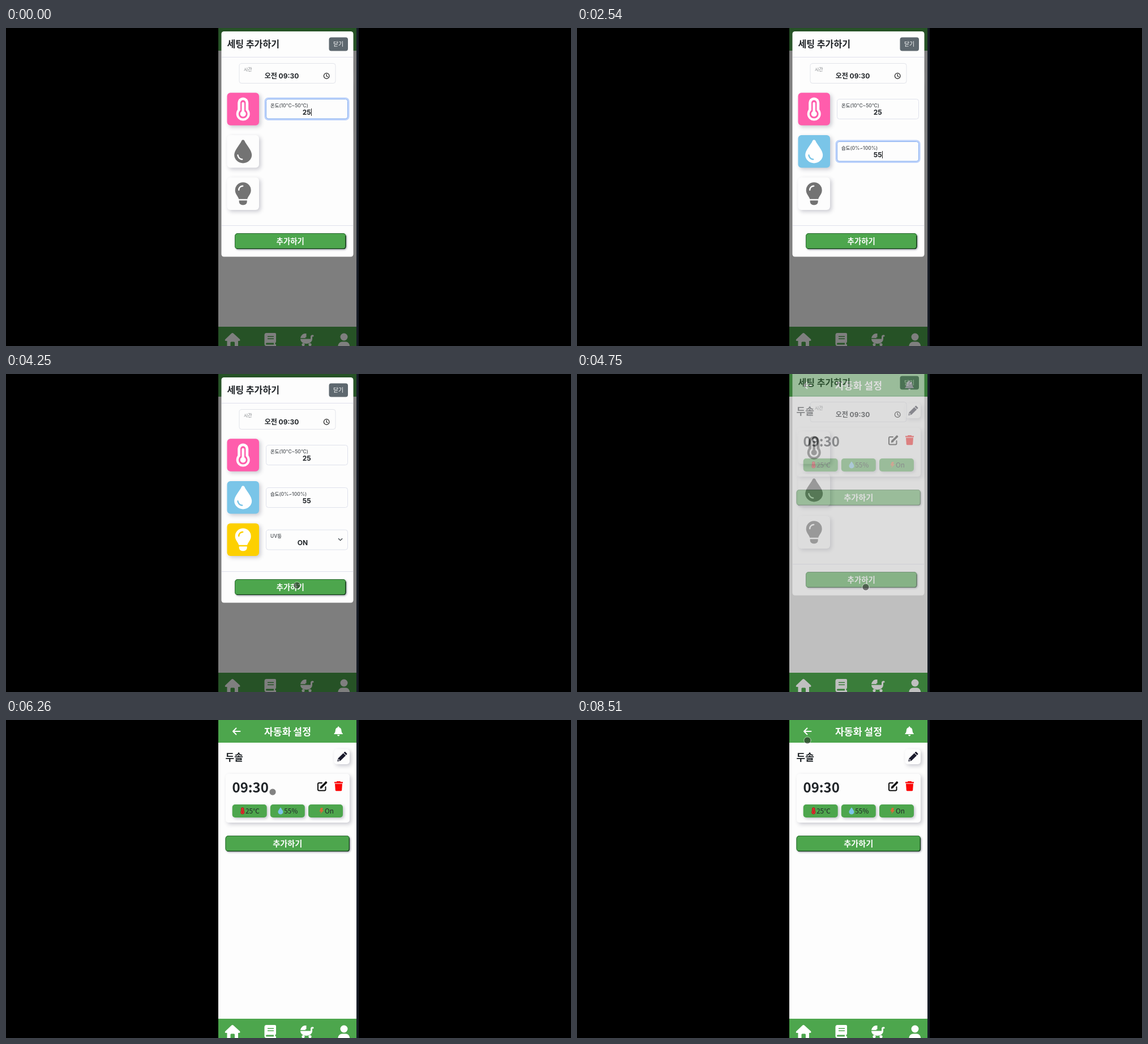
Recreate the animation shown at these times as an HTML page with a canvas. Size 998 by 561 pixels, loop 8.55 s.

```html
<!DOCTYPE html>
<html lang="ko">
<head>
<meta charset="utf-8">
<title>자동화 설정</title>
<style>
html, body { margin: 0; width: 100%; height: 100%; overflow: hidden; background: #000; }
canvas { display: block; }
</style>
</head>
<body>
<canvas id="stage" width="998" height="561"></canvas>
<script>
const W = 998, H = 561, LOOP = 8550;
const main = document.getElementById('stage').getContext('2d');
const layer = document.createElement('canvas');
layer.width = W;
layer.height = H;
const sheet = layer.getContext('2d');
let c = main;

const GREEN = '#4da64d', PAPER = '#fdfdfd', INK = '#212529', GREY = '#737373';
const NOTO = '"Noto Sans CJK KR", "Noto Sans CJK", sans-serif';
const INTER = 'Inter, ' + NOTO;

const CLOSE = 4675, FADE = 150;
const WATER_ON = 980, LAMP_ON = 3000;
const FOCUS = 1700, KEY1 = 2050, KEY2 = 2330, BLUR = 2960;

function box(x, y, w, h, r, fill, stroke, lw = 1) {
  c.beginPath();
  c.roundRect(x, y, w, h, r);
  if (fill) { c.fillStyle = fill; c.fill(); }
  if (stroke) { c.strokeStyle = stroke; c.lineWidth = lw; c.stroke(); }
}

function shadowBox(x, y, w, h, r, fill, off = 3, blur = 7, alpha = 0.24) {
  c.save();
  c.shadowColor = `rgba(40,40,70,${alpha})`;
  c.shadowOffsetX = c.shadowOffsetY = off;
  c.shadowBlur = blur;
  box(x, y, w, h, r, fill);
  c.restore();
}

// cy is the visual middle of the line
function text(s, x, cy, size, color, weight = 700, family = NOTO, align = 'left') {
  c.font = `${weight} ${size}px ${family}`;
  c.textAlign = align;
  c.fillStyle = color;
  c.fillText(s, x, cy + size * 0.37);
}

function disc(x, y, r, fill) {
  c.beginPath();
  c.arc(x, y, r, 0, Math.PI * 2);
  c.fillStyle = fill;
  c.fill();
}

function line(d, color, width) {
  c.strokeStyle = color;
  c.lineWidth = width;
  c.lineCap = c.lineJoin = 'round';
  c.stroke(new Path2D(d));
}

function shape(d, color) {
  c.fillStyle = color;
  c.fill(new Path2D(d), 'evenodd');
}

function at(x, y, scale, draw) {
  c.save();
  c.translate(x, y);
  c.scale(scale, scale);
  draw();
  c.restore();
}

function thermometer(fg, bg) {
  line('M0 -11V8', fg, 19);
  disc(0, 8.5, 12, fg);
  line('M0 -11V8', bg, 9.5);
  disc(0, 8.5, 8, bg);
  line('M0 -10V8', fg, 4.5);
  disc(0, 8.5, 5, fg);
}

function drop(fg, bg) {
  shape('M0 -20.5C1.5 -20.5 2.4 -19.5 3 -18C5 -13 15.5 -2 15.5 6A15.5 14.7 0 0 1 -15.5 6C-15.5 -2 -5 -13 -3 -18C-2.4 -19.5 -1.5 -20.5 0 -20.5Z', fg);
  if (bg) line('M-9.3 6.5A8.5 8.3 0 0 0 -1.5 14', bg, 2.4);
}

function bulb(fg, bg) {
  shape('M0 -20A14 14 0 0 1 14 -6C14 1 9 4 7.5 9.5H-7.5C-9 4 -14 1 -14 -6A14 14 0 0 1 0 -20Z', fg);
  shape('M-7 12H7V14A6 6 0 0 1 1 20H-1A6 6 0 0 1 -7 14Z', fg);
  line('M-7.5 -6.5A7 7 0 0 1 -.5 -13.5', bg, 2.4);
}

function bigButton(x, y, w, label, size) {
  shadowBox(x, y, w, 28, 5, GREEN, 1.5, 3, 0.4);
  box(x + 0.5, y + 0.5, w - 1, 27, 5, null, '#2f6c35', 1);
  line(`M${x + 4} ${y + 27.4}H${x + w - 4}Q${x + w - 0.6} ${y + 27.4} ${x + w - 0.6} ${y + 23}V${y + 5}`, '#173c1d', 1.4);
  text(label, x + w / 2, y + 14, size, '#fff', 700, NOTO, 'center');
}

function navBar() {
  c.fillStyle = GREEN;
  c.fillRect(375, 527, 244, 34);
  const w = '#fff';
  shape('M400 538Q401 538 402 539L413 549Q414.5 552 411.5 552H410V565H404V555Q404 553.5 402.5 553.5H398Q396.5 553.5 396.5 555V565H390.5V552H388.5Q385.5 552 387.5 549L398 539Q399 538 400 538Z', w);
  shape('M460 538H475Q477 538 477 540V553Q477 555 475.5 555.5V558H477V561H460Q456.5 561 456.5 557V542Q456.5 538 460 538ZM462 543.5V545H473V543.5ZM462 547.5V549H473V547.5ZM460.5 555.5Q459 555.5 459 557T460.5 558.5H473V555.5Z', w);
  shape('M529 539V547H520A10 9 0 0 1 529 539Z', w);
  shape('M520 548.5H538V545Q538 541.5 541 541.5H542.5Q543.5 541.5 543.5 543T542.5 544.5H541V549A10.5 8 0 0 1 520 549Z', w);
  shape('M530.5 546L523.5 540.5Q527 538.5 530.5 539Z', w);
  disc(525, 558.5, 2.6, w);
  disc(537, 558.5, 2.6, w);
  disc(597, 545, 6.5, w);
  shape('M586 565Q586 553.5 594 553.5H600Q607.5 553.5 607.5 565Z', w);
}

function pill(x, label, textX, icon) {
  shadowBox(x, 149, 61, 23, 5, GREEN, 2, 5, 0.28);
  icon();
  text(label, textX, 160.5, 11.8, INK, 400);
}

function page() {
  c.fillStyle = PAPER;
  c.fillRect(375, 0, 244, H);
  c.fillStyle = GREEN;
  c.fillRect(375, 0, 244, 40);
  line('M413.5 20H401M406.5 14.5L401 20L406.5 25.5', '#fff', 2);
  text('자동화 설정', 497.5, 20.5, 17.2, '#fff', 700, NOTO, 'center');
  shape('M586 12Q587.2 10.5 588.3 12V13Q592.5 14 592.5 19Q592.5 22 594.8 24V25H579.5V24Q581.8 22 581.8 19Q581.8 14 586 13ZM585 26H589.4Q588.5 28.6 587.2 28.6T585 26Z', '#fff');

  text('두솔', 387.5, 66, 17, INK, 700);
  shadowBox(579.5, 51.5, 27.5, 26.5, 5, PAPER);
  at(593, 65.5, 1, () => {
    c.rotate(Math.PI / 4);
    shape('M-3 -10Q-3 -11 -2 -11H2Q3 -11 3 -10V-8H-3ZM-3 -7H3V6L0 11L-3 6ZM-1.5 6.2L0 8.7L1.5 6.2Z', '#1b1b2d');
  });

  shadowBox(388, 95, 219, 86, 5, PAPER);
  text('09:30', 399.5, 119, 24, INK, 700);
  line('M558 111H553Q551 111 551 113V122.5Q551 124.5 553 124.5H562.5Q564.5 124.5 564.5 122.5V118', '#111', 2);
  line('M557 118.5L564.3 111.2', '#111', 3.6);
  shape('M554.5 121.2L555.8 116.5L559.5 120Z', '#111');
  shape('M563 109.8L564.3 108.4Q565.2 107.8 566 108.6L567 109.6Q567.6 110.4 567 111.2L565.6 112.5Z', '#111');
  shape('M584.5 108H590.5L591.3 109.3H595V111.5H580V109.3H583.7ZM581 112.5H594L593.2 123.7Q593 125.3 591.4 125.3H583.6Q582 125.3 581.8 123.7Z', '#fb0707');

  pill(399.7, '25℃', 423, () => at(417.8, 160.3, 0.29, () => thermometer('#c5161c', '#e0564a')));
  pill(466.8, '55%', 491.3, () => at(485, 160.5, 0.29, () => drop('#7cc4ea')));
  pill(534, 'On', 563, () => shape('M556 155H560L558.5 159H561.5L555 166L556.5 161.5H553.5Z', '#d8693a'));

  bigButton(387.5, 204, 219.5, '추가하기', 14.2);
  navBar();
}

function field(y, label, value, cx, focused) {
  if (focused) {
    box(458, y - 1, 147, 37.5, 5.5, null, '#bed3fb', 3.2);
    box(459.5, y + 0.5, 144, 34.5, 4, PAPER, '#86aff0', 1);
  } else {
    box(459.5, y + 0.5, 144, 35, 4, PAPER, '#dfe2ec', 1);
  }
  text(label, 467, y + 11.5, 8.4, '#606468', 600, INTER);
  text(value, cx, y + 23.5, 12, INK, 700, INTER, 'center');
  if (focused) {
    const x = value ? 531.5 + value.length * 3.8 : 531.5;
    c.fillStyle = '#222';
    c.fillRect(Math.round(x), y + 17, 1, 13);
  }
}

function tile(y, on, color, icon) {
  const bg = on ? color : PAPER;
  shadowBox(390.5, y, 56.5, 57.5, 6, bg);
  at(418.7, y + 28.7, 1, () => icon(on ? '#fff' : GREY, bg));
}

function modal(t) {
  const open = t < CLOSE;
  const water = open && t >= WATER_ON;
  const lamp = open && t >= LAMP_ON;
  box(380.5, 6, 233, 397.5, 4.5, PAPER);
  text('세팅 추가하기', 390.5, 28.5, 16.1, INK, 700);
  box(570.5, 16.5, 33.5, 24, 4, '#5e686f');
  text('닫기', 587, 28.5, 9.8, '#fff', 400, NOTO, 'center');
  c.fillStyle = '#dfe0ec';
  c.fillRect(381, 51, 232, 1);
  c.fillRect(381, 348, 232, 1);

  box(412, 62.5, 170, 35, 4, PAPER, '#e2e4ea', 1);
  text('시간', 420, 72.8, 7.9, '#73777b', 400);
  text('오전 09:30', 487, 84.5, 12, INK, 700, INTER, 'center');
  line('M571 84.5A4.8 4.8 0 1 1 561.4 84.5A4.8 4.8 0 1 1 571 84.5M566.2 81.7V84.7L568.2 86', '#1c1c1c', 1.2);

  tile(114.3, open, '#ff5dac', thermometer);
  tile(189, water, '#7ac5e8', drop);
  tile(263.5, lamp, '#fdd000', bulb);

  if (open) field(125, '온도(10°C~50°C)', '25', 531.3, t < WATER_ON - 80);
  if (water) {
    const typed = t < KEY1 ? '' : t < KEY2 ? '5' : '55';
    field(200, '습도(0%~100%)', typed, 531.3, t >= FOCUS && t < BLUR);
  }
  if (lamp) {
    field(274.5, 'UV등', 'ON', 524, false);
    line('M587.4 290.5L590.6 293.7L593.8 290.5', '#343a40', 1.2);
  }
  bigButton(404, 362, 196.5, '추가하기', 13.4);
}

// time, x, y
const path = [
  [520, 516, 172], [900, 424, 220], [1080, 424, 220], [1480, 501, 224],
  [2700, 501, 224], [2940, 424, 294], [3150, 424, 294], [4150, 514, 373],
  [4400, 514, 373], [4700, 510, 376], [5150, 510, 376], [6200, 471, 127],
  [6900, 471, 127], [8400, 407, 36], [8550, 407, 36]
];

function pointer(t) {
  if (t < 520 || (t > 1850 && t < 2700)) return;
  const i = Math.max(1, path.findIndex(p => p[0] >= t));
  const [t0, x0, y0] = path[i - 1], [t1, x1, y1] = path[i];
  const u = (t - t0) / (t1 - t0), e = u * u * (3 - 2 * u);
  const x = x0 + (x1 - x0) * e, y = y0 + (y1 - y0) * e;
  disc(x, y, 5.8, 'rgba(35,35,35,.56)');
  c.beginPath();
  c.arc(x, y, 6.2, 0, Math.PI * 2);
  c.strokeStyle = 'rgba(255,255,255,.5)';
  c.lineWidth = 1;
  c.stroke();
}

function render(t) {
  c = main;
  c.fillStyle = '#000';
  c.fillRect(0, 0, W, H);
  c.fillStyle = '#161b25';
  c.fillRect(619, 0, 4, H);
  c.save();
  c.beginPath();
  c.rect(375, 0, 244, H);
  c.clip();
  page();
  const gone = Math.min(1, Math.max(0, (t - CLOSE) / FADE));
  if (gone < 1) {
    c.fillStyle = `rgba(0,0,0,${0.5 * (1 - gone)})`;
    c.fillRect(375, 0, 244, H);
    c = sheet;
    c.clearRect(0, 0, W, H);
    modal(t);
    c = main;
    c.globalAlpha = 1 - gone;
    c.drawImage(layer, 0, -Math.round(26 * gone));
    c.globalAlpha = 1;
  }
  pointer(t);
  c.restore();
}

const start = performance.now();
function tick() {
  render((performance.now() - start) % LOOP);
  requestAnimationFrame(tick);
}
tick();
</script>
</body>
</html>
```
